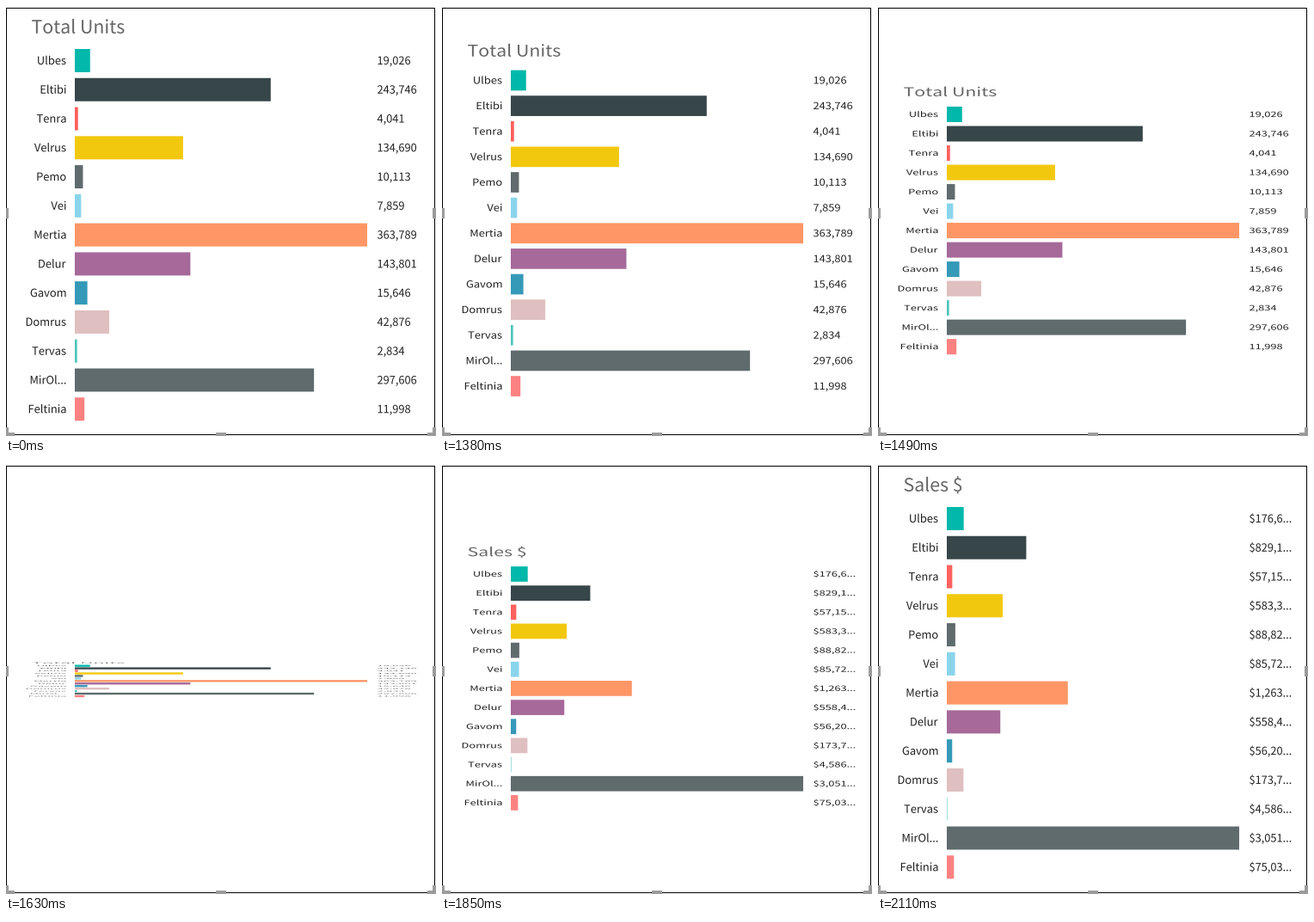
Animation of 500x500 px, one loop 2.44 s. Source, as a matplotlib script:

```python
import matplotlib.pyplot as plt
import numpy as np
from matplotlib.animation import FuncAnimation
from matplotlib.patches import PathPatch, Rectangle
from matplotlib.textpath import TextPath
from matplotlib.transforms import Affine2D

SIZE, LOOP, TICK = 500, 2440, 10
START, END, REDRAWS = 1290, 2110, 20    # the card turns over in 20 steps
AXIS_Y = 251                            # horizontal line it turns around
BAR_X, BAR_MAX, BAR_H = 80, 340, 27
TOP, PITCH = 50, 33.77
FONT = {"family": "Noto Sans CJK JP"}
INK, TITLE_INK, HANDLE = "#212121", "#666666", "#9b9b9b"

# name, colour, units, sales
ROWS = [
    ("Ulbes", "#01B8AA", 19026, 176600),
    ("Eltibi", "#374649", 243746, 829100),
    ("Tenra", "#FD625E", 4041, 57150),
    ("Velrus", "#F2C80F", 134690, 583300),
    ("Pemo", "#5F6B6D", 10113, 88820),
    ("Vei", "#8AD4EB", 7859, 85720),
    ("Mertia", "#FE9666", 363789, 1263000),
    ("Delur", "#A66999", 143801, 558400),
    ("Gavom", "#3599B8", 15646, 56200),
    ("Domrus", "#DFBFBF", 42876, 173700),
    ("Tervas", "#4AC5BB", 2834, 4586),
    ("MirOl...", "#5F6B6D", 297606, 3051000),
    ("Feltinia", "#FB8281", 11998, 75030),
]

fig = plt.figure(figsize=(5, 5), dpi=100, facecolor="white")
ax = fig.add_axes([0, 0, 1, 1])
ax.set(xlim=(0, SIZE), ylim=(SIZE, 0))
ax.axis("off")

flip = Affine2D()
turned = flip + ax.transData


def box(x, y, w, h, color, **kw):
    return ax.add_patch(Rectangle((x, y), w, h, fc=color, lw=0, **kw))


def text(x, y, s, size, color, right=False):
    path = TextPath((0, 0), s, size=size, prop=FONT)
    if right:
        x -= path.get_extents().x1
    path = path.transformed(Affine2D().scale(1, -1).translate(x, y))
    return ax.add_patch(PathPatch(path, fc=color, lw=0, transform=turned))


def side(title, column, fmt):
    parts = [text(29.5, 31.8, title, 21.3, TITLE_INK)]
    scale = BAR_MAX / max(row[column] for row in ROWS)
    for i, row in enumerate(ROWS):
        y = TOP + PITCH * i
        parts += [
            box(BAR_X, y, row[column] * scale, BAR_H, row[1],
                transform=turned, snap=False),
            text(69.5, y + 18, row[0], 12.9, INK, right=True),
            text(431.5, y + 18, fmt(row[column]), 12.8, INK),
        ]
    return parts


def border():
    box(0, 2, 499, 497, "black")
    box(1, 3, 497, 495, "white")
    box(SIZE / 2 - 6, 496, 12, 4, HANDLE)
    for edge, thick in ((0, 3), (496, 4)):
        box(edge, 235, thick, 12, HANDLE)
        box(edge, 490, thick, 10, HANDLE)
        box(min(edge, 490), 496, 10, 4, HANDLE)


border()
front = side("Total Units", 2, "{:,}".format)
back = side("Sales $", 3, lambda v: f"${v:,}"[:6] + "...")


def angle(t):
    pace = (END - START) / (REDRAWS - 1)
    step = np.floor((t - START) / pace + 0.15) + 1
    return np.interp(step, [0, 1, 4, 14, REDRAWS], [0, 8, 39, 131, 180])


def update(i):
    c = np.cos(np.radians(angle(i * TICK)))
    flip.clear().translate(0, -AXIS_Y).scale(1, abs(c)).translate(0, AXIS_Y)
    for p in front:
        p.set_visible(c > 0)
    for p in back:
        p.set_visible(c <= 0)
    return front + back


anim = FuncAnimation(fig, update, frames=LOOP // TICK, interval=TICK,
                     repeat=True, repeat_delay=0, blit=False)
plt.show()
```
